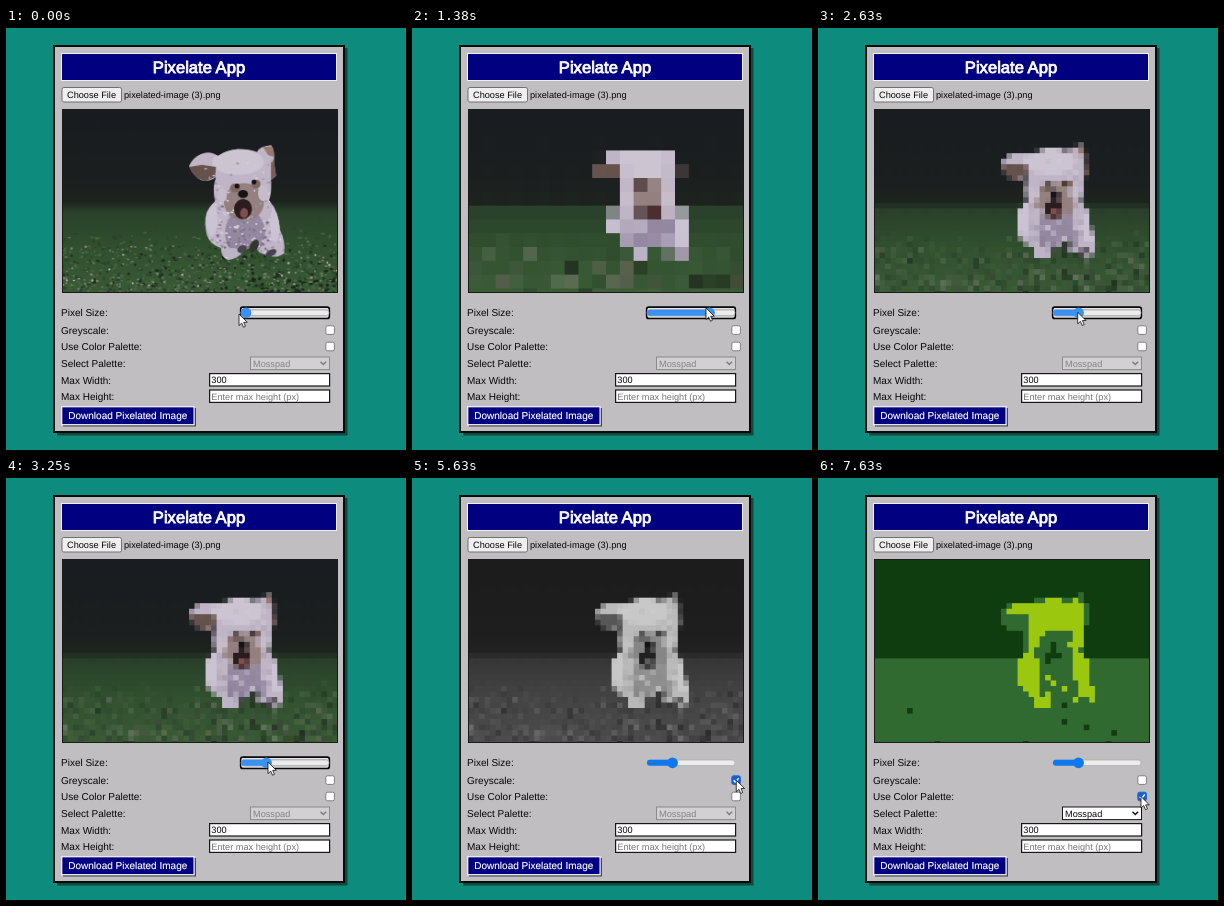
An HTML page with a canvas for the animation above (8 s loop, 400 px wide and 422 px high).

```html
<!DOCTYPE html>
<html lang="en">
<head>
<meta charset="utf-8">
<title>Pixelate App</title>
<style>
html, body { margin: 0; width: 100%; height: 100%; overflow: hidden; background: #0d8b7d; }
svg, canvas { position: absolute; display: block; }
svg { left: 0; top: 0; }
canvas { left: 56px; top: 81px; width: 276px; height: 184px; outline: 1px solid #171c18; outline-offset: -1px; }
text { font-family: "Liberation Sans", Arial, sans-serif; text-rendering: geometricPrecision; font-size: 10px; fill: #050505; }
.ctl { font-size: 9.2px; }
</style>
</head>
<body>
<svg width="400" height="422" viewBox="0 0 400 422">
  <rect width="400" height="422" fill="#0d8b7d"/>
  <rect x="51" y="20" width="290.5" height="387.5" fill="#12483f"/>
  <rect x="48" y="18" width="290" height="386" fill="#c0bec0" stroke="#0a0a0a" stroke-width="2"/>

  <rect x="55.5" y="25.5" width="275" height="27" fill="#000080" stroke="#f0f0f4"/>
  <text x="193" y="45" text-anchor="middle" style="font-size:16.6px;fill:#fff;stroke:#fff;stroke-width:.85px">Pixelate App</text>

  <rect x="56" y="59.5" width="59.5" height="14.5" rx="1.8" fill="#efefef" stroke="#707070"/>
  <text class="ctl" x="61" y="69.6">Choose File</text>
  <text class="ctl" x="118" y="69.6">pixelated-image (3).png</text>

  <text x="55" y="288.3">Pixel Size:</text>
  <text x="55" y="306">Greyscale:</text>
  <text x="55" y="322.4">Use Color Palette:</text>
  <text x="55" y="339">Select Palette:</text>
  <text x="55" y="355.5">Max Width:</text>
  <text x="55" y="372">Max Height:</text>

  <g id="ring" fill="none">
    <rect x="234.7" y="279.2" width="88.6" height="11.2" rx="2" stroke="#080808" stroke-width="1.7"/>
    <rect x="236" y="280.5" width="86" height="8.6" rx="1" stroke="#f4f4f4" stroke-width=".8"/>
  </g>
  <rect x="235" y="282" width="88" height="5.6" rx="2.8" fill="#ececec" stroke="#a9a9a9" stroke-width=".7"/>
  <rect id="fill" x="235" y="281.8" width="5" height="6" rx="2.8"/>
  <circle id="thumb" cx="240" cy="284.8" r="5.4"/>

  <g id="grey"></g>
  <g id="use"></g>

  <rect id="select" x="244.5" y="329" width="79" height="12.6"/>
  <text class="ctl" id="choice" x="247" y="338.6">Mosspad</text>
  <path id="arrow" d="M314.5 333.8L317.3 336.6L320.1 333.8" fill="none" stroke-width="1.4"/>

  <g fill="#fff" stroke="#161616" stroke-width="1.2">
    <rect x="203.6" y="345.6" width="120" height="12.4"/>
    <rect x="203.6" y="362" width="120" height="12.4"/>
  </g>
  <text class="ctl" x="205.3" y="355.2">300</text>
  <text class="ctl" x="205.3" y="371.5" style="fill:#777">Enter max height (px)</text>

  <rect x="57" y="380" width="133" height="18.5" fill="#45454c"/>
  <rect x="55.7" y="378.7" width="132.4" height="18" fill="#000080" stroke="#eeeef2" stroke-width="1.3"/>
  <text x="62.3" y="391.3" style="fill:#fff;stroke:#fff;stroke-width:.15px">Download Pixelated Image</text>

  <path id="cursor" d="M0 0V11.6L2.7 9.1L4.5 13.2L6.5 12.3L4.7 8.3H8.3Z" fill="#fff" stroke="#111" stroke-width=".8"/>
</svg>
<canvas id="view" width="300" height="200"></canvas>

<script>
const LOOP = 8000, STEP = 125, W = 300, H = 200;
const $ = id => document.getElementById(id);
const set = (id, attrs) => { for (const k in attrs) $(id).setAttribute(k, attrs[k]); };

// time, cursor x, cursor y, pixel size
const KEYS = [
  [0, 233, 286, 1], [1000, 314, 284, 19], [1375, 294, 280, 15], [1875, 266, 284, 7],
  [2125, 256, 285, 5], [2375, 256, 285, 5], [2750, 261, 284, 6], [3125, 263, 284, 6],
  [3250, 262, 284, 6], [3500, 262, 284, 6], [4875, 324.5, 303, 6], [5125, 324, 302, 6],
  [5500, 324, 302, 6], [5875, 325, 303, 6], [6000, 325, 303, 6], [6500, 321.5, 318, 6],
  [7125, 323, 318.5, 6], [8000, 323, 318.5, 6]
];

let seed = 11;
function rnd(a = 1, b = 0) {
  seed = (seed * 16807) % 2147483647;
  return b + (a - b) * seed / 2147483647;
}

// The picture is laid out in stage coordinates.
function paintPhoto() {
  const c = document.createElement("canvas");
  c.width = W; c.height = H;
  const g = c.getContext("2d", { willReadFrequently: true });
  g.scale(W / 276, H / 184);
  g.translate(-56, -81);

  const shape = (d, color) => { g.fillStyle = color; g.fill(new Path2D(d)); };
  const oval = (x, y, rx, ry, color, turn = 0) => {
    g.fillStyle = color;
    g.beginPath();
    g.ellipse(x, y, rx, ry, turn, 0, 7);
    g.fill();
  };
  const specks = (n, color, x0, x1, y0, y1, r0, r1) => {
    for (let i = 0; i < n; i++)
      oval(rnd(x1, x0), y0 + (y1 - y0) * Math.sqrt(rnd()), rnd(r1, r0), rnd(r1, r0) * .7, color);
  };

  const bg = g.createLinearGradient(0, 81, 0, 265);
  [[0, "#191c20"], [.4, "#1c1f1f"], [.5, "#1d231e"], [.56, "#2a412b"],
   [.75, "#31502f"], [1, "#3a5a36"]].forEach(s => bg.addColorStop(...s));
  g.fillStyle = bg;
  g.fillRect(56, 81, 276, 184);

  specks(260, "#2b432b", 56, 332, 188, 265, .8, 2.4);
  specks(260, "#46653f", 56, 332, 195, 265, .8, 2.2);
  specks(90, "#1f2d1e", 56, 332, 205, 265, .8, 2.2);
  specks(60, "#1b281a", 215, 332, 222, 264, 1, 2.6);
  specks(130, "#71806c", 56, 332, 206, 264, .7, 1.9);
  specks(60, "#8a7f74", 56, 332, 206, 262, .7, 1.6);
  specks(22, "#b5b0ae", 56, 332, 208, 258, .8, 1.7);

  const dog = "M183 138Q187 129 195 126Q204 122 212 128Q220 122 232 121Q243 121 251 124" +
    "Q253 118 265 117Q269 121 268 134L270 148L265 152Q266 166 263 172Q273 184 274 202" +
    "Q280 214 278 225Q272 231 260 227Q252 225 249 218L238 222Q232 231 222 232" +
    "Q215 230 215 220Q202 216 200 203Q197 188 204 179L209 173Q206 160 210 149" +
    "Q203 154 195 152Q187 148 183 138Z";
  shape(dog, "#bfb5c6");
  g.save();
  g.clip(new Path2D(dog));
  oval(232, 134, 26, 13, "#cdc4d2");
  oval(239, 205, 20, 24, "#9388a0");
  oval(238, 174, 20, 19, "#94807f");
  shape("M182 139L196 137L210 139L209 149L199 153L191 150Z", "#66524d");
  shape("M257 119L271 118V130L262 127Z", "#98796b");
  shape("M265 132H272V152H265Z", "#775f58");
  specks(150, "#d8d0de", 183, 278, 122, 230, .7, 1.7);
  specks(110, "#a095aa", 200, 278, 122, 230, .7, 1.7);
  specks(50, "#7b7086", 210, 265, 175, 230, .8, 2);
  oval(206, 192, 6, 16, "#cbc2d3");
  oval(269, 195, 5, 19, "#cbc2d3");
  oval(226, 225, 9, 5, "#bdb3c7");
  g.restore();

  oval(216, 167, 5, 7, "#c6bcca");
  oval(257, 165, 5, 8, "#c6bcca");
  oval(229, 160, 5, 4.5, "#7d6763");
  oval(250, 156, 4.5, 4.5, "#7d6763");
  oval(231, 158, 2.4, 2.5, "#141214");
  oval(248, 154, 2.4, 2.5, "#141214");
  oval(237, 181, 9, 10, "#2a1c1f", .1);
  oval(238, 185, 4, 5, "#80504f", .1);
  oval(237, 166, 5, 4, "#151316");
  oval(236, 221, 5, 3.5, "#4a4650", -.5);
  oval(265, 225, 6, 3.2, "#47424c", -.5);
  oval(248, 218, 4, 7, "#30372f", .5);
  return c;
}

const photo = paintPhoto();
const src = photo.getContext("2d").getImageData(0, 0, W, H).data;
const view = $("view").getContext("2d");

function sample(x, y) {
  const sum = [0, 0, 0];
  for (let j = -1; j < 2; j++)
    for (let i = -1; i < 2; i++) {
      const px = Math.min(W - 1, Math.max(0, x + i)), py = Math.min(H - 1, Math.max(0, y + j));
      for (let k = 0; k < 3; k++) sum[k] += src[(py * W + px) * 4 + k] / 9;
    }
  return sum;
}

function tone(rgb, mode) {
  const lum = .3 * rgb[0] + .59 * rgb[1] + .11 * rgb[2];
  if (mode === "grey") return `rgb(${lum},${lum},${lum})`;
  if (mode === "palette") return lum < 51 ? "#0f3d0f" : lum < 166 ? "#306a30" : "#9bc80f";
  return `rgb(${rgb})`;
}

let shown = "";
function pixelate(size, mode) {
  if (shown === size + mode) return;
  shown = size + mode;
  if (size < 2) return view.drawImage(photo, 0, 0);
  for (let y = 0; y < H; y += size)
    for (let x = 0; x < W; x += size) {
      view.fillStyle = tone(sample(x + (size >> 1), y + (size >> 1)), mode);
      view.fillRect(x, y, size, size);
    }
}

function checkbox(id, y, on) {
  $(id).innerHTML =
    `<rect x="319.8" y="${y}" width="8.6" height="8.6" rx="1.7" fill="${on ? "#1560d4" : "#fff"}" stroke="${on ? "#1560d4" : "#747474"}" stroke-width=".9"/>` +
    (on ? `<path d="M321.6 ${y + 4.5}l1.8 1.9l3.3-4.1" fill="none" stroke="#fff" stroke-width="1.3"/>` : "");
}

function pose(t) {
  let i = 0;
  while (i < KEYS.length - 2 && t >= KEYS[i + 1][0]) i++;
  const a = KEYS[i], b = KEYS[i + 1];
  const u = (t - a[0]) / (b[0] - a[0]), e = u * u * (3 - 2 * u);
  return a.map((v, k) => v + (b[k] - v) * e).slice(1);
}

function draw(t) {
  const [x, y, level] = pose(t);
  const size = Math.round(level);
  const grey = t >= 5000 && t < 5750, pal = t >= 7000;
  const focus = t < 4875, blue = t < 3625 ? "#3b90f5" : "#0f78ee";
  const thumb = 240 + 78 * (size - 1) / 19;

  pixelate(size, grey ? "grey" : pal ? "palette" : "");
  set("ring", { visibility: focus ? "visible" : "hidden" });
  set("fill", { width: thumb - 235, fill: blue });
  set("thumb", { cx: thumb, fill: blue });
  checkbox("grey", 297.8, grey);
  checkbox("use", 314.2, pal);
  set("select", { fill: pal ? "#fff" : "#d2d0d2", stroke: pal ? "#161616" : "#8b8b8b" });
  set("arrow", { stroke: pal ? "#111" : "#7c7c7c" });
  $("choice").style.fill = pal ? "#0a0a0a" : "#858585";
  set("cursor", { transform: `translate(${x} ${y})` });
}

let last = -1;
function tick() {
  const t = Math.floor(performance.now() % LOOP / STEP) * STEP;
  if (t !== last) draw(last = t);
  requestAnimationFrame(tick);
}
tick();
</script>
</body>
</html>
```
